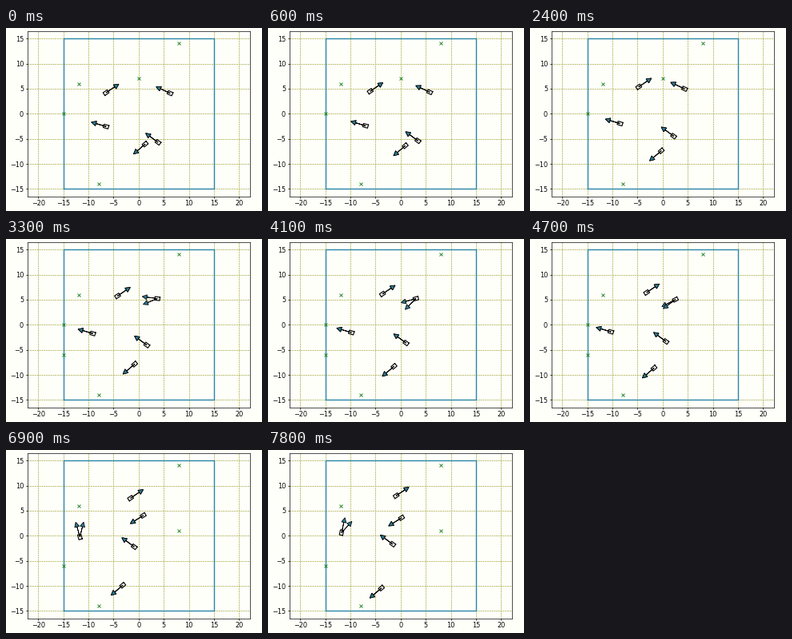
Write a matplotlib script that moves like this. It is 320 px wide and 229 px high and loops after 8000 ms.

```python
import numpy as np
import matplotlib.pyplot as plt
from matplotlib.animation import FuncAnimation

W, H, DPI = 320, 229, 100
PX = 72 / DPI            # one pixel in points
STEP, FRAMES = 200, 40   # ms per frame, frames per loop
SPEED, WHEELBASE, MAX_STEER = 0.867, 1.0, np.radians(30)
BODY_L, BODY_W = 1.0, 0.68
ARROW, HEAD = 2.1, 0.95
BACK = "#fffffa"


class Car:
    """Bicycle model that steers to its goal, then to a later one if given."""

    def __init__(self, start, goal, later=None, switch=FRAMES):
        (x, y), self.path = start, []
        yaw = np.arctan2(goal[1] - y, goal[0] - x)
        dist = SPEED * STEP / 1000
        for i in range(FRAMES):
            gx, gy = goal if i < switch else later
            err = np.arctan2(gy - y, gx - x) - yaw
            err = (err + np.pi) % (2 * np.pi) - np.pi
            steer = np.clip(2 * err, -MAX_STEER, MAX_STEER)
            self.path.append((x, y, yaw, steer, (gx, gy)))
            x += dist * np.cos(yaw)
            y += dist * np.sin(yaw)
            yaw += dist / WHEELBASE * np.tan(steer)


cars = [
    Car((-6.5, 4.2), (8, 14)),
    Car((6.25, 4.1), (0, 7), later=(-15, -6), switch=13),
    Car((1.3, -6.05), (-8, -14)),
    Car((3.85, -5.7), (-12, 6)),
    Car((-6.5, -2.55), (-15, 0), later=(8, 1), switch=24),
]

fig = plt.figure(figsize=(W / DPI, H / DPI), dpi=DPI, facecolor=BACK)
ax = fig.add_axes([26.7 / W, 18.2 / H, 278.3 / W, 207 / H], facecolor=BACK)
ax.set_xlim(-22.18, 22.18)
ax.set_ylim(-16.5, 16.5)
ax.set_xticks(range(-20, 21, 5))
ax.set_yticks(range(-15, 16, 5))
ax.tick_params(labelsize=8.1 * PX, length=2.4 * PX, width=0.8 * PX, pad=2.3 * PX)
ax.grid(True, color="#aeb255", lw=0.8 * PX, ls=(0, (2.5, 1)))
ax.set_axisbelow(True)
for spine in ax.spines.values():
    spine.set(linewidth=0.8 * PX, color="#222222")

ax.plot([-15, 15, 15, -15, -15], [-15, -15, 15, 15, -15],
        color="#2a86a8", lw=1.4 * PX)
goals, = ax.plot([], [], "x", color="#16801a", ms=4.6 * PX, mew=0.9 * PX)
bodies = [ax.plot([], [], color="black", lw=1.15 * PX)[0] for _ in cars]
arrows = []

CORNERS = np.array([[-1, -1], [1, -1], [1, 1], [-1, 1], [-1, -1]]) \
    * [BODY_L / 2, BODY_W / 2]


def add_arrow(x, y, angle):
    arrows.append(ax.arrow(x, y, ARROW * np.cos(angle), ARROW * np.sin(angle),
                           width=0.01, head_width=HEAD, head_length=HEAD,
                           fc="#2f7d94", ec="black", lw=0.8 * PX, zorder=3))


def draw(frame):
    while arrows:
        arrows.pop().remove()
    marks = []
    for body, car in zip(bodies, cars):
        x, y, yaw, steer, goal = car.path[frame]
        c, s = np.cos(yaw), np.sin(yaw)
        pts = CORNERS @ np.array([[c, s], [-s, c]]) + [x, y]
        body.set_data(pts[:, 0], pts[:, 1])
        add_arrow(x, y, yaw)
        add_arrow(x, y, yaw + steer)
        marks.append(goal)
    goals.set_data(*zip(*marks))
    return [goals, *bodies, *arrows]


anim = FuncAnimation(fig, draw, frames=FRAMES, interval=STEP,
                     init_func=lambda: draw(0), repeat=True, repeat_delay=0)
plt.show()
```
